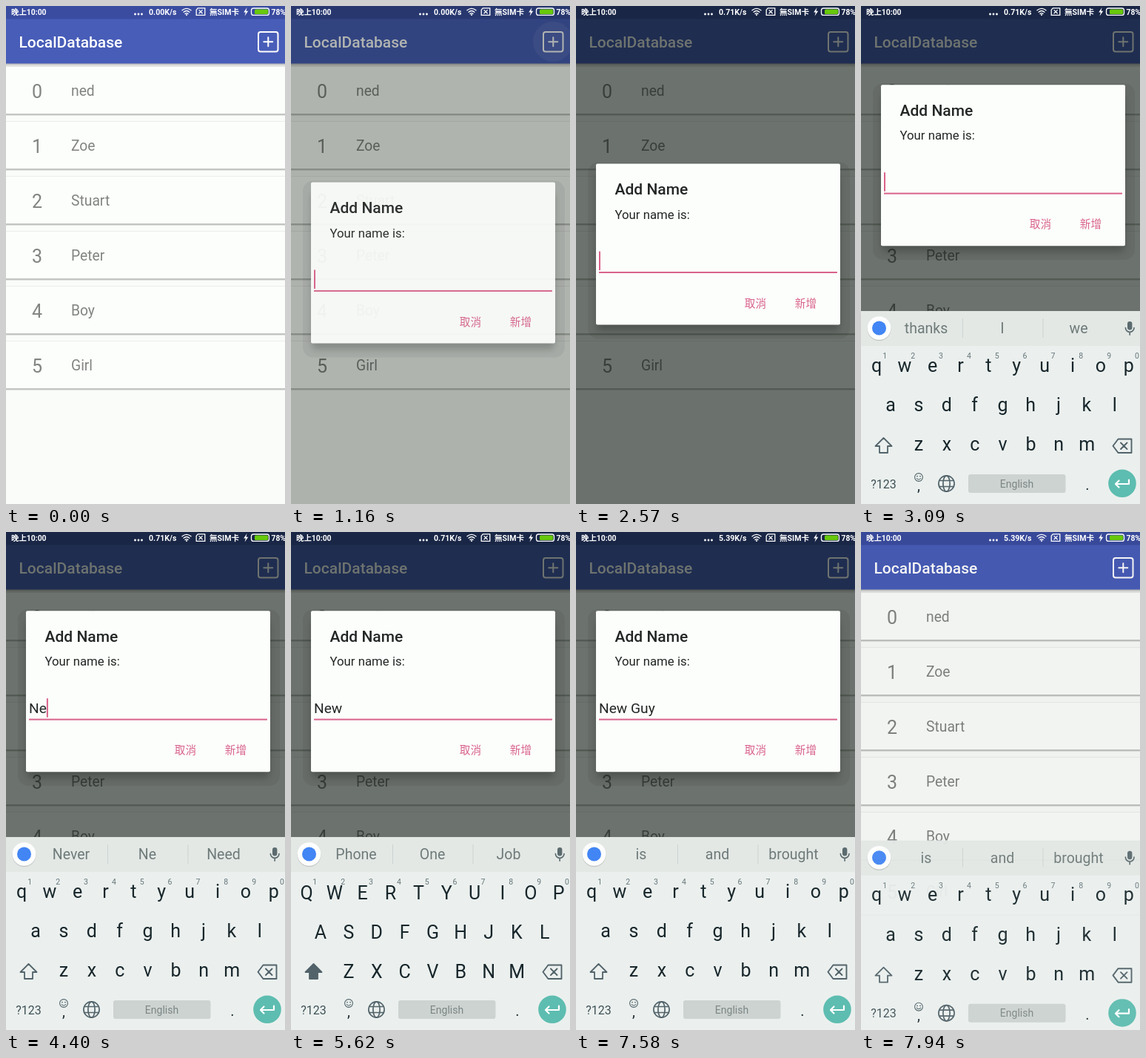
Write an HTML page that moves like this. It is 377 px wide and 671 px high and loops after 8000 ms.

```html
<!DOCTYPE html>
<html lang="zh-TW">
<head>
<meta charset="utf-8">
<title>LocalDatabase</title>
<style>
  html, body { margin: 0; width: 100%; height: 100%; overflow: hidden; background: #fafcf9; }
  svg { display: block; width: 100vw; height: 100vh; font-family: Roboto, "Noto Sans CJK TC", "Noto Sans CJK", sans-serif; }
  text { white-space: pre; }
  .mid { text-anchor: middle; }
  .line { fill: none; stroke-linecap: round; stroke-linejoin: round; }
</style>
</head>
<body>
<svg viewBox="0 0 377 671">
  <defs>
    <filter id="blur" x="-20%" y="-20%" width="140%" height="150%"><feGaussianBlur stdDeviation="5"/></filter>
    <linearGradient id="fade" x1="0" y1="0" x2="0" y2="1">
      <stop offset="0" stop-opacity=".3"/><stop offset="1" stop-opacity="0"/>
    </linearGradient>
  </defs>

  <rect width="377" height="671" fill="#fafcf9"/>
  <g id="list" fill="#828482"></g>
  <rect y="77" width="377" height="5" fill="url(#fade)"/>
  <rect width="377" height="77.5" fill="#485db8"/>
  <rect width="377" height="17.5" fill="#3a4ca0"/>
  <text x="17.5" y="56" font-size="21" font-weight="500" fill="#fff">LocalDatabase</text>
  <circle id="ripple" cx="354" cy="48" r="27" fill="#fff"/>
  <g class="line" stroke="#fff" stroke-width="2">
    <rect x="341" y="35" width="26.5" height="26.5" rx="3"/>
    <path d="M348.3 48.2h12M354.3 42.2v12"/>
  </g>

  <rect id="dim" width="377" height="671" fill="#000a02"/>

  <g fill="#fff" font-size="10.6" font-weight="700">
    <text x="7" y="11.8" font-size="10.4">晚上10:00</text>
    <circle cx="174.5" cy="11" r="1.4"/><circle cx="179" cy="11" r="1.4"/><circle cx="183.5" cy="11" r="1.4"/>
    <text id="rate" x="193" y="11.8"></text>
    <g class="line" stroke="#fff" stroke-width="1.3">
      <path d="M238 5.8q6-5 12 0M240 8.2q4-3.4 8 0M242 10.5q2-1.8 4 0"/>
      <path d="M259.5 2.8h9.3v9.6h-11.6v-7.3zM261 5.6l4.2 4.2M265.2 5.6l-4.2 4.2"/>
      <rect x="331.5" y="3" width="24" height="9.4" rx="3"/>
    </g>
    <circle cx="244" cy="12" r="1.1"/>
    <text x="275" y="11.8">無SIM卡</text>
    <path d="M325.6 2l-4.4 6.5h2.7l-1.3 5 4.6-6.8h-2.8z"/>
    <rect x="336" y="4.4" width="18.2" height="6.6" rx="1.5" fill="#68c80c"/>
    <text x="358.5" y="11.8" font-size="10.3">78%</text>
  </g>

  <g id="dialog">
    <rect x="16" y="-2" width="354" height="238" rx="14" opacity=".06"/>
    <rect x="28" y="14" width="328" height="211" rx="6" opacity=".2" filter="url(#blur)"/>
    <rect x="27" width="330" height="217" rx="2" fill="#fcfefb"/>
    <g fill="#222624">
      <text x="52.5" y="41.5" font-size="21" font-weight="500">Add Name</text>
      <text x="52.5" y="74" font-size="16.8">Your name is:</text>
      <text id="input" x="31" y="138.3" font-size="19.2"></text>
    </g>
    <g fill="#d9628b" font-size="14.6">
      <rect x="31" y="145.4" width="322" height="2"/>
      <rect id="caret" y="118" width="2" height="25.5"/>
      <text x="227.8" y="193.3">取消</text>
      <text x="295.8" y="193.3">新增</text>
    </g>
  </g>

  <g id="kb">
    <rect y="411" width="377" height="290" fill="#ebf0ee"/>
    <rect y="411" width="377" height="47" fill="#e3e8e5"/>
    <circle cx="24.5" cy="435.3" r="16" opacity=".13"/>
    <circle cx="24.5" cy="434" r="15.8" fill="#fdfefd"/>
    <circle cx="24.5" cy="434" r="9.5" fill="#4285f4"/>
    <path d="M137.5 421v26M246 421v26" stroke="#ccd3d0"/>
    <g id="hints" class="mid" font-size="19.5" fill="#6e7a79"></g>
    <rect x="360" y="425" width="6.4" height="11.5" rx="3.2" fill="#5b6b6f"/>
    <path class="line" d="M357.4 433.5a5.8 5.8 0 0 0 11.6 0M363.2 439.5v3.5" stroke="#5b6b6f" stroke-width="1.7"/>
    <g id="keys" class="mid"></g>
    <path id="shift" d="M30.5 582l11 11h-5.5v9h-11v-9h-5.5z" stroke="#52636a" stroke-width="1.8" stroke-linejoin="round"/>
    <g class="line" stroke="#52636a" stroke-width="1.9">
      <path d="M347.5 583.5h18v18.5h-18l-7-9.25zM351 588.5l8.5 8.5M359.5 588.5l-8.5 8.5"/>
      <g stroke-width="1.7">
        <circle cx="115.5" cy="643.5" r="10.6"/><ellipse cx="115.5" cy="643.5" rx="4.6" ry="10.6"/>
        <path d="M106 639.5h19M106 647.5h19"/>
      </g>
      <g stroke-width="1.1"><circle cx="78" cy="635" r="5.4"/><path d="M75.3 636.5q2.7 3 5.4 0"/></g>
    </g>
    <g fill="#52636a"><circle cx="76" cy="633.6" r=".9"/><circle cx="80" cy="633.6" r=".9"/></g>
    <rect x="145" y="631" width="131.5" height="25" rx="3" fill="#cdd3d1"/>
    <g class="mid" fill="#3f5156">
      <text x="30.5" y="649.5" font-size="16">?123</text>
      <text x="78" y="653" font-size="20" fill="#1d2b30">,</text>
      <text x="306" y="652" font-size="20" fill="#1d2b30">.</text>
      <text x="210.5" y="648.5" font-size="14" fill="#7b8685">English</text>
    </g>
    <circle cx="353" cy="643.3" r="18.8" fill="#5dbdb0"/>
    <path class="line" d="M362 638.5v5.5h-18M348.5 639.5l-4.5 4.5 4.5 4.5" stroke="#fff" stroke-width="2.2"/>
  </g>
</svg>
<script>
const LOOP = 8000, PITCH = 74;
const $ = id => document.getElementById(id);
const clamp = v => Math.max(0, Math.min(1, v));
const ramp = (t, a, b) => clamp((t - a) / (b - a));
const smooth = p => p * p * (3 - 2 * p);
const latest = (steps, t) => steps.filter(s => s[0] <= t).pop();
const setText = (el, s) => { if (el.textContent !== s) el.textContent = s; };

function add(parent, tag, attrs, str = '') {
  const el = document.createElementNS('http://www.w3.org/2000/svg', tag);
  for (const k in attrs) el.setAttribute(k, attrs[k]);
  el.textContent = str;
  parent.appendChild(el);
  return el;
}

['ned', 'Zoe', 'Stuart', 'Peter', 'Boy', 'Girl'].forEach((name, i) => {
  const y = 82 + i * PITCH, list = $('list');
  const band = (top, height, fill) => add(list, 'rect', { y: y + top, width: 377, height, fill });
  band(-1, 1, '#eceeeb');
  band(0, 63, '#fcfefb');
  band(63, 2, '#c2c5c1');
  band(65, 1, '#e2e5e1');
  add(list, 'text', { x: 35, y: y + 42.2, 'font-size': 25 }, String(i));
  add(list, 'text', { x: 88, y: y + 39.4, 'font-size': 19.3 }, name);
});

const keys = [];
[['qwertyuiop', 21], ['asdfghjkl', 40], ['zxcvbnm', 78]].forEach(([row, x0], r) => {
  [...row].forEach((ch, i) => {
    const x = x0 + i * 37.85, y = 492.8 + r * 53.2;
    const el = add($('keys'), 'text', { x, y, 'font-size': 25, fill: '#17262b' });
    keys.push({ el, ch, y });
    if (!r) add($('keys'), 'text', { x: x + 11.3, y: 475, 'font-size': 10.5, fill: '#66757a' }, String((i + 1) % 10));
  });
});
const hints = [88, 191, 294].map(x => add($('hints'), 'text', { x, y: 441 }));

// time, typed text, shift, suggestions
const typing = [
  [0, '', 0, 'thanks I we'],
  [3560, '', 1, 'Thanks I We'],
  [3900, 'N', 0, 'No N Not'],
  [4300, 'Ne', 0, 'Never Ne Need'],
  [4650, 'New', 0, 'News New Newest'],
  [5060, 'New ', 0, 'phone one job'],
  [5380, 'New ', 1, 'Phone One Job'],
  [5800, 'New G', 0, 'Good G Go'],
  [6250, 'New Gu', 0, 'Guess Gu Guy'],
  [6620, 'New Guy', 0, 'Guys Guy Guy\'s'],
  [7000, 'New Guy ', 0, 'is and brought']
];
const rates = [[0, '0.00K/s'], [2050, '0.71K/s'], [6870, '5.39K/s']];
const caretResets = [[1100], [2900], ...typing.filter((s, i) => i && s[1] !== typing[i - 1][1])];

function draw(t) {
  const [, text, shift, words] = latest(typing, t);

  $('ripple').setAttribute('opacity', .16 * (ramp(t, 900, 990) - ramp(t, 990, 1300)));
  $('dim').setAttribute('opacity', .57 * (ramp(t, 1005, 1295) - ramp(t, 7660, 7962)));
  setText($('rate'), latest(rates, t)[1]);

  const top = 237.5 - 131.3 * smooth(ramp(t, 2496, 2765));
  $('dialog').setAttribute('transform', `translate(0 ${top})`);
  $('dialog').setAttribute('opacity', ramp(t, 1022, 1172) - ramp(t, 7660, 7860));

  setText($('input'), text);
  const reset = latest(caretResets, t);
  const on = reset && (t - reset[0]) % 1000 < 500;
  $('caret').setAttribute('opacity', on ? 1 : 0);
  $('caret').setAttribute('x', 31 + (text ? $('input').getComputedTextLength() : 0));

  const shown = smooth(ramp(t, 2585, 2800)), gone = ramp(t, 7905, 8105);
  $('kb').setAttribute('transform', `translate(0 ${26 * (1 - shown + gone)})`);
  $('kb').setAttribute('opacity', shown * (1 - .3 * gone));
  $('shift').setAttribute('fill', shift ? '#52636a' : 'none');
  keys.forEach(k => {
    setText(k.el, shift ? k.ch.toUpperCase() : k.ch);
    k.el.setAttribute('y', k.y + 2 * shift);
  });
  words.split(' ').forEach((w, i) => setText(hints[i], w));
}

function tick() {
  draw(performance.now() % LOOP);
  requestAnimationFrame(tick);
}
tick();
</script>
</body>
</html>
```
